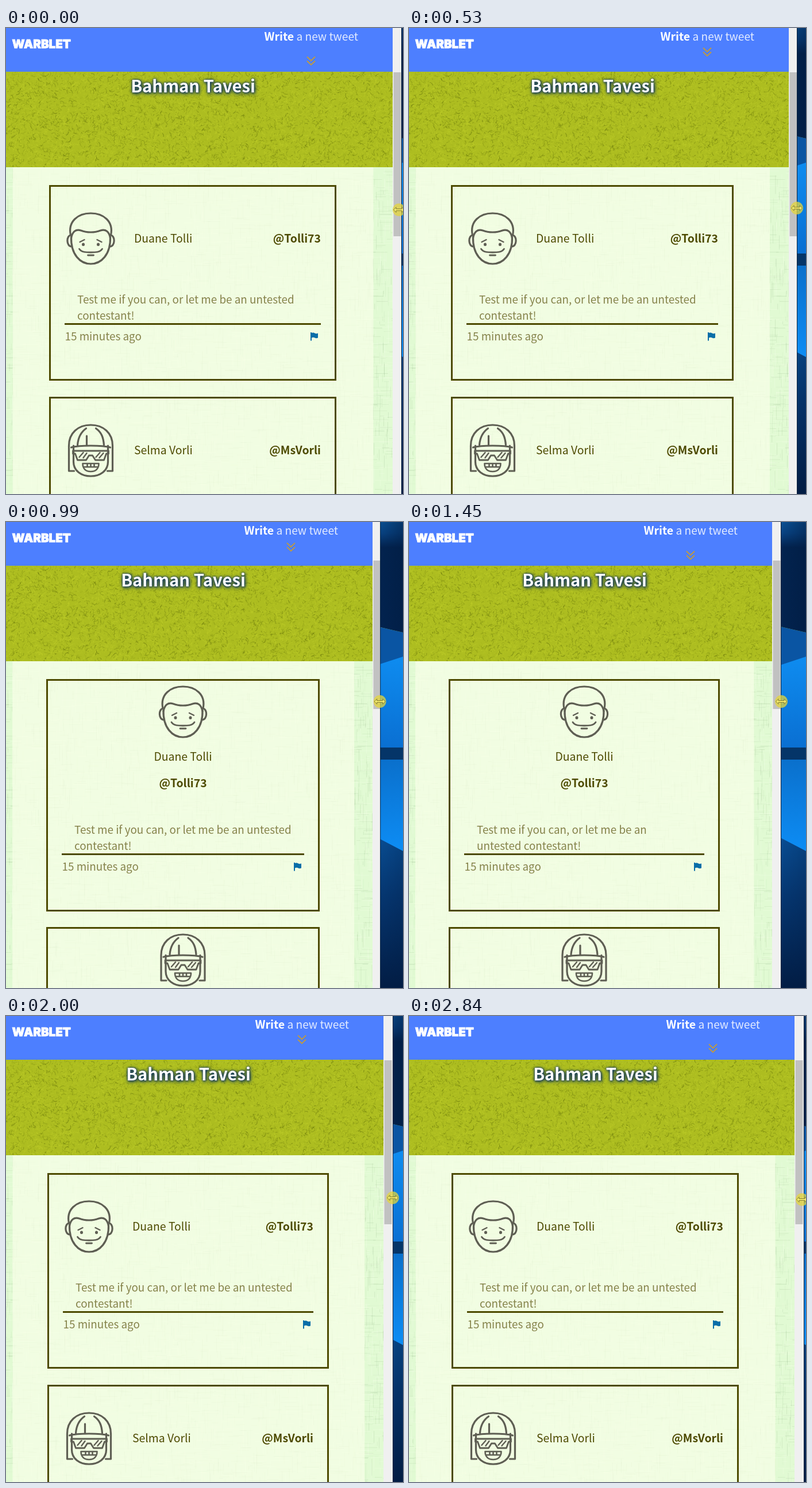
Animation of 691x810 px, one loop 2920 ms. Source, as an HTML page with a canvas:

```html
<!DOCTYPE html>
<html lang="en">
<head>
<meta charset="utf-8">
<title>Responsive page</title>
<style>
html, body { margin: 0; width: 100%; height: 100%; overflow: hidden; background: #dff8d0; }
canvas, svg { position: absolute; left: 0; top: 0; width: 691px; height: 810px; }
text { font: 400 19.4px "Noto Sans CJK JP", "Noto Sans", sans-serif; fill: #4d4a00; white-space: pre; }
.light { font-size: 18.85px; font-weight: 300; fill: #85824a; }
.bold { font-weight: 700; }
.black { font-size: 19.6px; font-weight: 900; fill: #fff; }
.logo { font: 900 20.5px Inter, Roboto, sans-serif; fill: #fff; stroke: #fff; stroke-width: .8; }
.title { font-size: 29.2px; font-weight: 700; fill: #fff; text-shadow: 0 0 3px #12385c, 1px 1px 5px #12385c, 1px 2px 7px #12385c; }
.write { font-size: 19.1px; fill: #e4ecff; }
.box, .rule { fill: none; stroke: #4d4a00; stroke-width: 3; }
.face { fill: none; stroke: #5e5e53; stroke-width: 3.2; stroke-linecap: round; stroke-linejoin: round; }
</style>
</head>
<body>
<canvas id="paper" width="691" height="810"></canvas>
<svg viewBox="0 0 691 810">
  <defs>
    <linearGradient id="sky" x2="0" y2="1">
      <stop offset="0" stop-color="#0d5ca6"/>
      <stop offset=".1" stop-color="#0a4c92"/>
      <stop offset=".23" stop-color="#032552"/>
    </linearGradient>
    <linearGradient id="beam" x2="0" y2="1">
      <stop offset="0" stop-color="#0e8cf0"/>
      <stop offset="1" stop-color="#0a6fd2"/>
    </linearGradient>
    <linearGradient id="lower" x2="0" y2="1">
      <stop offset="0" stop-color="#0a70cc"/>
      <stop offset="1" stop-color="#0d8df5"/>
    </linearGradient>
    <linearGradient id="floor" x2="0" y2="1">
      <stop offset="0" stop-color="#0a559f"/>
      <stop offset=".4" stop-color="#063a77"/>
      <stop offset="1" stop-color="#021d45"/>
    </linearGradient>
    <linearGradient id="dim">
      <stop offset="0" stop-color="#011b40" stop-opacity="0"/>
      <stop offset="1" stop-color="#011b40" stop-opacity=".6"/>
    </linearGradient>
    <clipPath id="desk"><rect id="deskClip" y="0" width="100" height="810"/></clipPath>
  </defs>
  <rect id="panel" y="242" height="568" fill="#f8ffe8" fill-opacity=".72"/>
  <g id="cards"></g>
  <rect id="header" height="76" fill="#4d7fff"/>
  <text class="logo" x="10.5" y="34.5">WARBLET</text>
  <text id="write" class="light write" y="22" text-anchor="end"><tspan class="black">Write</tspan> a new tweet</text>
  <path id="chevron" d="M-7-7L0-.3L7-7M-7 .2L0 7L7 .2" fill="none" stroke="#c39a3c" stroke-width="1.9"/>
  <text id="title" class="title" y="112" text-anchor="middle">Bahman Tavesi</text>
  <rect id="track" width="16" height="810" fill="#f0f0f0"/>
  <rect id="thumb" width="13" fill="#c1c1c1"/>
  <g clip-path="url(#desk)">
    <path d="M630 0H691V192L630 178Z" fill="url(#sky)"/>
    <path d="M630 0H691V192L630 178Z" fill="url(#dim)"/>
    <path d="M630 178L691 192V238L630 254Z" fill="#0a55a3"/>
    <path d="M630 254L691 234V394H630Z" fill="url(#beam)"/>
    <path d="M630 392H691V413H630Z" fill="#053568"/>
    <path d="M630 413H691V574L630 540Z" fill="url(#lower)"/>
    <path d="M630 540L691 572V810H630Z" fill="url(#floor)"/>
    <path d="M630 540L691 572V810H630Z" fill="url(#dim)" opacity=".5"/>
    <rect id="edge" width="1" height="810" fill="#0a2440"/>
  </g>
  <g id="cursor">
    <circle r="11" fill="#e4d53a" fill-opacity=".75"/>
    <path d="M-9.500 0L-5-4.500V-1.500H5V-4.500L9.500 0L5 4.500V1.500H-5V4.500Z" fill="#f2e96a" stroke="#7a7430" stroke-width=".9"/>
  </g>
</svg>
<script>
const $ = id => document.getElementById(id);
const set = (el, attrs) => { for (const k in attrs) el.setAttribute(k, attrs[k]); };

// Paper textures, painted once
let seed = 7;
const rnd = () => (seed = (seed * 16807) % 2147483647) / 2147483647;
const ctx = $('paper').getContext('2d');

function linen() {
  ctx.fillStyle = '#e1fad3';
  ctx.fillRect(0, 242, 691, 568);
  for (let i = 0; i < 6000; i++) {
    const len = 5 + rnd() * 28, across = rnd() < .5;
    ctx.fillStyle = rnd() < .4 ? 'rgba(250,255,240,.3)' : `rgba(105,145,95,${.03 + rnd() * .18})`;
    ctx.fillRect(rnd() * 720 - 30, 242 + rnd() * 568, across ? len : .7, across ? .7 : len);
  }
}

function felt() {
  ctx.save();
  ctx.beginPath();
  ctx.rect(0, 76, 691, 166);
  ctx.clip();
  ctx.fillStyle = '#adbd20';
  ctx.fillRect(0, 76, 691, 166);
  for (let i = 0; i < 9000; i++) {
    const x = rnd() * 691, y = 76 + rnd() * 166, r = 1.5 + rnd() * 6, a = rnd() * 6.28;
    ctx.lineWidth = .6 + rnd() * .7;
    ctx.strokeStyle = rnd() < .5 ? 'rgba(196,210,44,.4)' : `rgba(92,106,8,${.08 + rnd() * .4})`;
    ctx.beginPath();
    ctx.arc(x, y, r, a, a + .5 + rnd() * 1.2);
    ctx.stroke();
  }
  ctx.restore();
}

const man = `
  <path d="M-35-6C-40-30-22-44 0-44S40-30 35-6"/>
  <path d="M-34-3C-35 28-18 44 0 44S35 28 34-3"/>
  <path d="M-34-6C-43-6-43 14-33 14M34-6C43-6 43 14 33 14"/>
  <path d="M-34-1C-32-12-26-17-17-14C-7-10 7-10 17-14C26-17 32-12 34-1"/>
  <path d="M-19 6L-11 2M19 6L11 2" stroke-width="2.4"/>
  <path d="M-13 10v.6M13 10v.6" stroke-width="5"/>
  <path d="M-20 18C-16 24-8 24 0 24S16 24 20 18M-5 29H5" stroke-width="2.8"/>`;

const woman = `
  <path d="M-29 36H-38V-8C-38-30-22-44 0-44S38-30 38-8V36H29"/>
  <path d="M-30-8V20C-30 36-16 45 0 45S30 36 30 20V-8"/>
  <path d="M-34-5C-20-9 20-9 34-5M-8-38C-18-31-22-22-23-9M-7-25V-9M9-38C19-31 22-22 23-9"/>
  <path d="M-31 1H31V6H27L23 17H8L3 9H-3L-8 17H-23L-27 6H-31Z" stroke-width="2.8"/>
  <path d="M-20 12L-13 4M-13 13L-7 5M9 12L16 4M15 13L22 5" stroke-width="2.4"/>
  <path d="M-14 23H14C14 32 9 37 0 37S-14 32-14 23ZM-13 29H13M-6 24V29M0 24V29M6 24V29" stroke-width="2.6"/>`;

const NS = 'http://www.w3.org/2000/svg';
function makeCard(name, handle, face) {
  const g = document.createElementNS(NS, 'g');
  g.innerHTML = `<rect class="box" x="1.5" y="1.5"/><g class="face">${face}</g>
    <text class="name">${name}</text><text class="handle bold">${handle}</text>
    <g class="body">
      <text class="light" x="49" y="206"></text><text class="light" x="49" y="234"></text>
      <path class="rule"/><text class="light" x="27.5" y="269.5">15 minutes ago</text>
      <path class="flag" fill="#0a6ea8"/>
    </g>`;
  $('cards').append(g);
  const q = s => g.querySelector(s);
  const parts = { box: q('.box'), face: q('.face'), name: q('.name'), handle: q('.handle'),
    body: q('.body'), lines: g.querySelectorAll('.body text'), rule: q('.rule'), flag: q('.flag') };

  return (x, y, w, narrow, wrap) => {
    set(g, { transform: `translate(${x} ${y})` });
    set(parts.box, { width: w - 3, height: (narrow ? 404 : 340) - 3 });
    set(parts.face, { transform: narrow ? `translate(${w / 2} 57)` : 'translate(72.5 93)' });
    set(parts.name, { x: narrow ? w / 2 : 148, y: narrow ? 142 : 100, 'text-anchor': narrow ? 'middle' : 'start' });
    set(parts.handle, { x: narrow ? w / 2 : w - 27, y: narrow ? 188 : 100, 'text-anchor': narrow ? 'middle' : 'end' });
    set(parts.body, { transform: `translate(0 ${narrow ? 63 : 0})` });
    parts.lines[0].textContent = 'Test me if you can, or let me be an' + (wrap ? '' : ' untested');
    parts.lines[1].textContent = (wrap ? 'untested ' : '') + 'contestant!';
    set(parts.rule, { d: `M27 241.5H${w - 27}` });
    set(parts.flag, { d: `M${w - 45} 256h2v1q3-1 5.5 .5t5.5 0v8q-3 1.5-5.5 0t-5.5 0v5h-2z` });
  };
}

const cards = [makeCard('Duane Tolli', '@Tolli73', man), makeCard('Selma Vorli', '@MsVorli', woman)];

// Keys are [step, value]
const pageW = [[0, 673], [7, 661], [11, 650], [14, 632], [21, 632], [26, 657], [28, 663], [31, 671]];
const edgeX = [[0, 688], [7, 675], [11, 659.5], [14, 647], [21, 647], [26, 673], [31, 687]];
const mouseX = [[0, 684], [7, 675], [11, 656], [14, 648], [21, 648], [26, 673], [31, 684]];
const mouseY = [[0, 316], [7, 313], [11, 312], [21, 312], [26, 316], [31, 319]];
const bounce = [[0, 57], [10, 37.5], [18.3, 58], [28.4, 38], [39.6, 58.5]];
const clock = [[0, 0], [70, 1], [530, 7], [600, 8], [1070, 14], [1140, 15], [1600, 21],
  [1680, 22], [2150, 28], [2240, 29], [2760, 36], [2840, 37], [2920, 37.8]];

const linear = p => p;
const sine = p => (1 - Math.cos(Math.PI * p)) / 2;
function at(keys, x, ease = linear) {
  const n = keys.findIndex(k => k[0] > x);
  if (n < 0) return keys[keys.length - 1][1];
  const [x0, a] = keys[n - 1], [x1, b] = keys[n];
  return a + (b - a) * ease((x - x0) / (x1 - x0));
}

function draw(step) {
  const w = Math.round(at(pageW, step)), edge = at(edgeX, step);
  const left = Math.floor(75.2 + (w - 673) * .146), right = Math.round(575.3 + (w - 673) * .83);
  const narrow = w < 655, wrap = w < 636, inner = w * .0175;
  set($('panel'), { x: inner, width: w * .95 - inner });
  set($('header'), { width: w });
  set($('write'), { x: w - 60 });
  set($('chevron'), { transform: `translate(${w - 142} ${at(bounce, step, sine)})` });
  set($('title'), { x: (left + right) / 2 + .5 });
  set($('track'), { x: w });
  set($('thumb'), { x: w + 1.5, y: narrow ? 67 : 77, height: narrow ? 258 : 285 });
  set($('deskClip'), { x: edge });
  set($('edge'), { x: edge });
  set($('cursor'), { transform: `translate(${at(mouseX, step)} ${at(mouseY, step)})` });
  cards.forEach((card, i) => card(left, 273 + i * (narrow ? 431 : 368), right - left, narrow, wrap));
}

linen();
felt();
let last = -1;
function tick() {
  const step = Math.floor(at(clock, performance.now() % 2920) + .15);
  if (step !== last) draw(last = step);
  requestAnimationFrame(tick);
}
tick();
</script>
</body>
</html>
```
